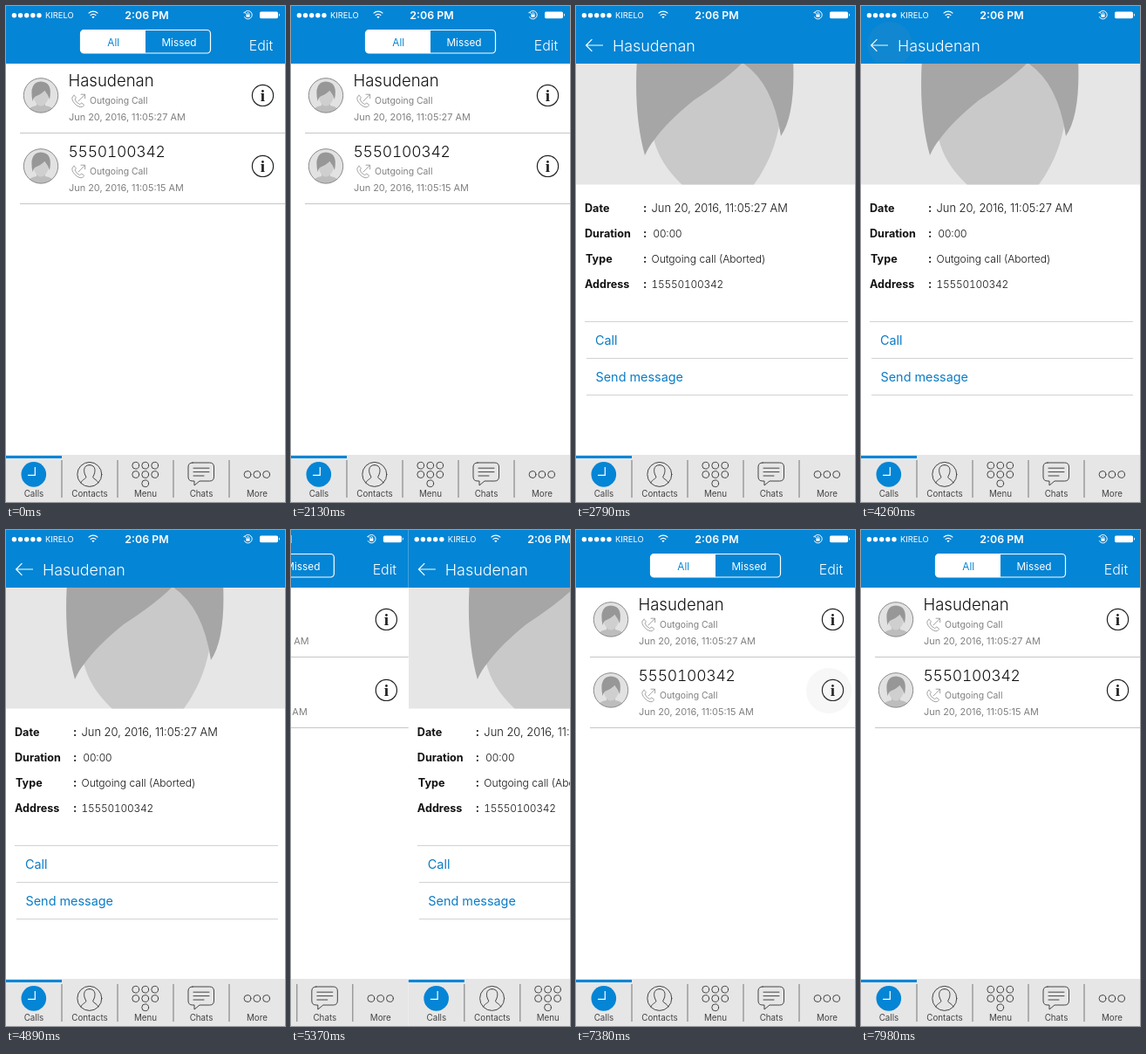
Animation of 320x568 px, one loop 8000 ms. Source, as an HTML page:

```html
<!DOCTYPE html>
<html lang="en">
<head>
<meta charset="utf-8">
<title>Call history</title>
<style>
  html, body { margin: 0; width: 100%; height: 100%; overflow: hidden; background: #fff; }
  svg { display: block; width: 320px; height: 568px; }
  text { font-family: Inter, "Liberation Sans", Arial, sans-serif; font-weight: 300; white-space: pre; }
  .num { font-feature-settings: "tnum" 1; letter-spacing: -.2px; }
  .mid { text-anchor: middle; }
  .reg { font-weight: 400; }
  .semi { font-weight: 600; }
  .bold { font-weight: 700; }
  .line { fill: none; stroke: #444; stroke-width: 1; stroke-linecap: round; stroke-linejoin: round; }
  .white { fill: none; stroke: #fff; stroke-width: 1.2; }
  .info { font: 700 19px "Liberation Serif", Times, serif; fill: #222; }
</style>
</head>
<body>
<svg viewBox="0 0 320 568">
  <defs>
    <clipPath id="header"><rect width="320" height="66"/></clipPath>
    <clipPath id="photo"><rect y="66" width="320" height="138.5"/></clipPath>
    <clipPath id="round"><circle cx="40" cy="102.4" r="19.5"/></clipPath>

    <g id="chrome">
      <rect width="320" height="66" fill="#0485d5"/>
      <g id="signal" fill="#fff"></g>
      <text x="45" y="14.2" font-size="9.4" class="reg" fill="#fff">KIRELO</text>
      <g class="white">
        <path d="M94.6 8.4Q100 3.8 105.4 8.4M96.7 10.8Q100 8 103.3 10.8"/>
        <path d="M98.4 12.4Q100 11.1 101.6 12.4L100 14.2Z" fill="#fff" stroke="none"/>
        <path d="M273.9 7.2A4.7 4.7 0 1 1 273.3 12.3M272.4 7.8L273.9 7L274.5 8.7" stroke-width="1"/>
        <path d="M276.2 10V8.9A1.3 1.3 0 0 1 278.8 8.9V10" stroke-width=".9"/>
      </g>
      <rect x="275.4" y="9.7" width="4.2" height="3" fill="#fff"/>
      <text x="161.5" y="14.7" font-size="12.4" class="mid semi" fill="#fff">2:06 PM</text>
      <rect x="291" y="6.4" width="21" height="7.8" rx="1.6" fill="#fff"/>
      <path d="M313 8.6Q315 10.3 313 12Z" fill="#fff"/>

      <rect y="514" width="320" height="54" fill="#e6e6e6"/>
      <rect y="515" width="64" height="3" fill="#0485d5"/>
      <path d="M64 520V563M128 520V563M192 520V563M256 520V563" stroke="#777"/>
      <circle cx="31.8" cy="536.4" r="14.3" fill="#0485d5"/>
      <path d="M33.3 528V537.4H25" class="white"/>
      <g class="line">
        <circle cx="95.8" cy="536.4" r="14"/>
        <path d="M95.8 525.6C88 525.6 88.6 534 91.8 539C92.4 541.6 87.5 541.6 85.8 546M95.8 525.6C103.6 525.6 103 534 99.8 539C99.2 541.6 104.1 541.6 105.8 546"/>
        <path d="M214 523H233.5Q238.5 523 238.5 528V539Q238.5 544 233.5 544H222L216 549V544H214Q209 544 209 539V528Q209 523 214 523ZM215 529.2H233M215 533.6H233M215 538H227"/>
        <g id="rings"></g>
      </g>
      <g id="tabs" class="mid" font-size="9.8" fill="#444"></g>
    </g>

    <g id="row">
      <circle cx="40" cy="102.4" r="20" fill="#e2e2e2"/>
      <g clip-path="url(#round)">
        <path d="M22 125Q24 116 35 114V109H45V114Q56 116 58 125Z" fill="#bdbdbd"/>
        <path d="M31 98H49Q50 108 44 113Q40 116 36 113Q31 108 31 98Z" fill="#cfcfcf"/>
        <path d="M30.5 109Q26 87 40 86.5Q54 87 50 107Q48 101 44.5 97Q39 102 33 104Q31 106 30.5 109Z" fill="#979797"/>
      </g>
      <circle cx="40" cy="102.4" r="19.7" fill="none" stroke="#8c8c8c"/>
      <path d="M78 102.4L80.4 104.8L79 107Q80.6 111 84.6 112.6L86.8 111L89.6 113.4Q88 116.6 84 115.4Q77.6 112.6 75.8 106.4Q75.4 103.6 78 102.4ZM83 109L90.4 101.4M86 101.2H90.6V105.8" class="line" style="stroke:#999;stroke-width:.9"/>
      <text x="96" y="112.4" font-size="10.4" class="reg" fill="#808080">Outgoing Call</text>
      <circle cx="294.5" cy="102.4" r="12.1" fill="none" stroke="#222" stroke-width="1.2"/>
      <text x="294.5" y="108.8" class="info mid">i</text>
      <path d="M16 145.5H320" stroke="#c6c6c6"/>
    </g>
  </defs>

  <rect width="320" height="568" fill="#fff"/>

  <g id="list">
    <use href="#chrome"/>
    <rect x="85.5" y="27.5" width="149" height="26.5" rx="4" class="white"/>
    <path d="M89.5 27.5H160V54H89.5Q85.5 54 85.5 50V31.5Q85.5 27.5 89.5 27.5Z" fill="#fff"/>
    <text x="123.3" y="45.6" font-size="11.8" class="mid reg" fill="#0485d5">All</text>
    <text x="198.5" y="45.6" font-size="11.8" class="mid reg" fill="#fff">Missed</text>
    <text x="278.8" y="51.2" font-size="15.9" fill="#fff">Edit</text>
    <use href="#row"/>
    <use href="#row" y="81"/>
    <text x="71.5" y="91.5" font-size="18.5" fill="#111">Hasudenan</text>
    <text x="71.5" y="172.5" font-size="17.5" fill="#111" class="num">5550100342</text>
    <g font-size="10.9" fill="#808080">
      <text x="72" y="131" class="reg">Jun 20, 2016, 11:05:27 AM</text>
      <text x="72" y="212" class="reg">Jun 20, 2016, 11:05:15 AM</text>
    </g>
  </g>

  <g id="detail">
    <rect width="320" height="568" fill="#fff"/>
    <use href="#chrome"/>
    <path d="M31 45H11.6M18.4 38.2L11.6 45L18.4 51.8" class="white"/>
    <text x="42" y="52" font-size="17.9" fill="#fff">Hasudenan</text>
    <g clip-path="url(#photo)">
      <rect y="65" width="320" height="140" fill="#e6e6e6"/>
      <path d="M88 60H236V112C234 150 222 180 203 206H123C104 188 94 172 89 152Z" fill="#c9c9c9"/>
      <path d="M70 60Q66 125 79 171Q84 160 90 153Q104 133 135 108Q172 84 191 65Q226 88 235 149Q252 124 249 60Z" fill="#a6a6a6"/>
    </g>
    <g id="facts" font-size="12.6" fill="#111"></g>
    <path d="M10 361.5H312M12 403.5H312M12 445.5H312" stroke="#d2d2d2"/>
    <g fill="#0a7cc6" font-size="14.4">
      <text x="22" y="388" class="reg">Call</text>
      <text x="22.5" y="430" class="reg">Send message</text>
    </g>
  </g>

  <g clip-path="url(#header)"><circle id="backTap" cx="33" cy="44" fill="#999"/></g>
  <circle id="rowTap" cx="290" fill="#999"/>
</svg>
<script>
const LOOP = 8000, STEP = 30, WIDTH = 320;
const $ = id => document.getElementById(id);
const circle = (x, y, r) => `<circle cx="${x}" cy="${y}" r="${r}"/>`;
const label = (x, y, s, attrs = '') => `<text x="${x}" y="${y}" ${attrs}>${s}</text>`;

$('signal').innerHTML = [0, 1, 2, 3, 4].map(i => circle(9.4 + i * 7.15, 10.7, 2.7)).join('');
$('tabs').innerHTML = ['Calls', 'Contacts', 'Menu', 'Chats', 'More']
  .map((s, i) => label(32 + i * 64, 561.8, s, 'class="reg"')).join('');

const keys = [-1, 0, 1].map(i =>
  circle(159.7 + i * 11, 526.2, 3.9) + circle(159.7 + i * 11, 536.5, 3.9) + circle(287.8 + i * 10.8, 536.5, 3.9));
$('rings').innerHTML = keys.join('') + circle(159.7, 546.8, 3.9);

const facts = [
  ['Date', 10, 'Jun 20, 2016, 11:05:27 AM', 86.5, 12.9],
  ['Duration', 10, '00:00', 88.5, 12],
  ['Type', 11, 'Outgoing call (Aborted)', 86.5, 12.1],
  ['Address', 10, '15550100342', 86.5, 11.9, 'num']
];
$('facts').innerHTML = facts.map(([name, nx, value, vx, size, cls = ''], i) => {
  const y = 235.8 + i * 29;
  return label(nx, y, name, 'class="bold"') + label(77, y, ':', 'class="bold"') +
    label(vx, y, value, `font-size="${size}" class="${cls}"`);
}).join('');

const clamp = v => Math.min(1, Math.max(0, v));
const ease = v => v * v * (3 - 2 * v);
const span = (t, a, b) => clamp((t - a) / (b - a));

// Progress, radius, opacity
const ripple = [[0, 26, .08], [.3, 22, .3], [.65, 28, .2], [1, 33, 0]];

function tap(el, p) {
  const i = Math.max(1, ripple.findIndex(k => p <= k[0]));
  const a = ripple[i - 1], b = ripple[i];
  const u = (p - a[0]) / (b[0] - a[0]);
  const mix = n => a[n] + (b[n] - a[n]) * u;
  const active = p >= 0 && p < 1;
  el.setAttribute('r', active ? mix(1) : 0);
  el.setAttribute('opacity', active ? mix(2) : 0);
}

function draw(now) {
  const t = Math.floor((now % LOOP) / STEP) * STEP;
  const shift = WIDTH * (ease(span(t, 2430, 2790)) - ease(span(t, 5200, 5580)));
  $('list').setAttribute('transform', `translate(${-shift})`);
  $('detail').setAttribute('transform', `translate(${WIDTH - shift})`);

  const second = t >= 5580;
  const progress = (a, b) => t < a || t >= b ? 1 : (t - a) / (b - a);
  $('rowTap').setAttribute('cy', second ? 184 : 102);
  tap($('rowTap'), second ? progress(7380, 7980) : progress(1500, 2130));
  tap($('backTap'), progress(4260, 4890));
}

const start = performance.now();
function tick() {
  draw(performance.now() - start);
  requestAnimationFrame(tick);
}
tick();
</script>
</body>
</html>
```
